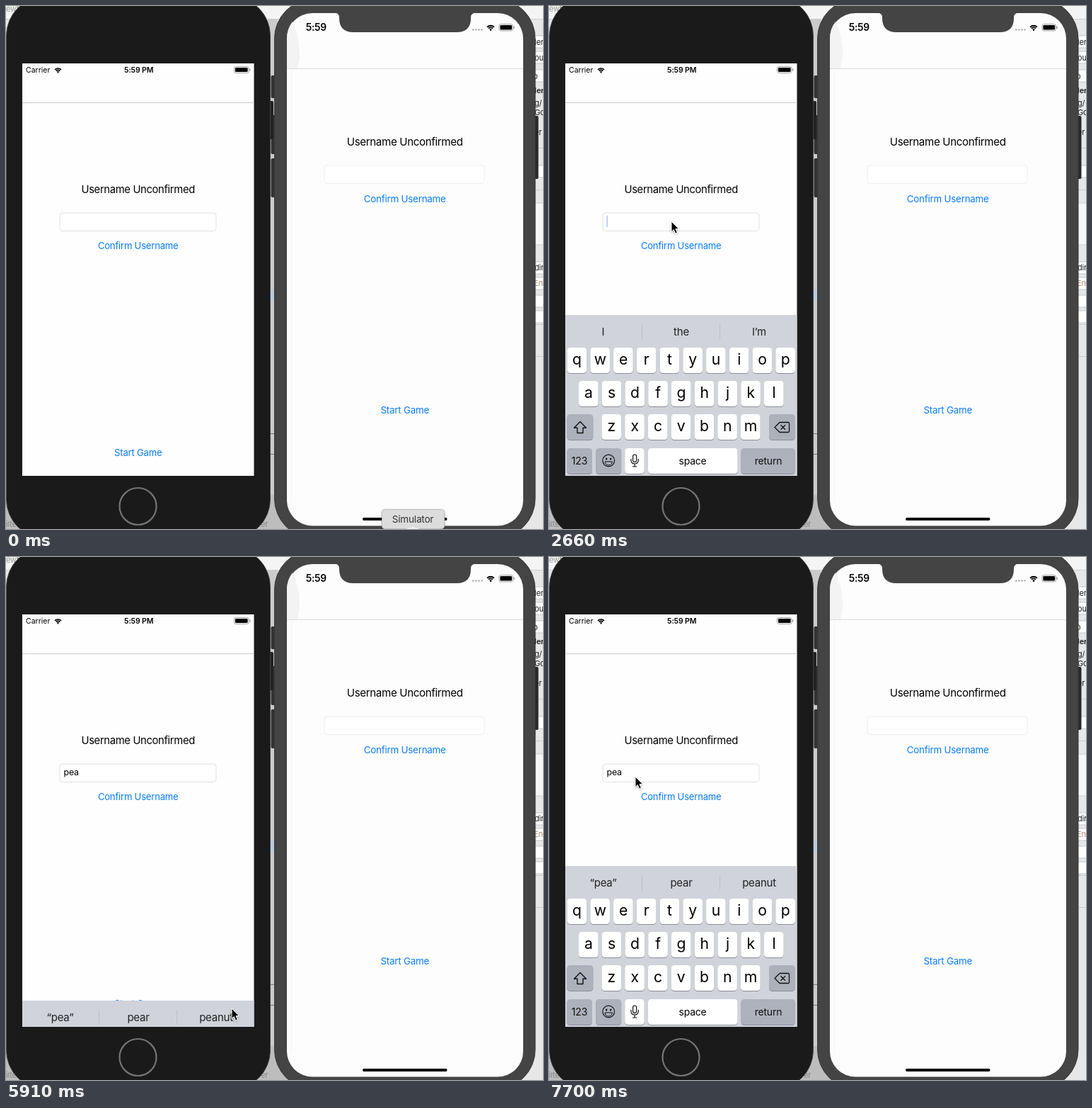
Write an HTML page that moves like this. It is 759 px wide and 738 px high and loops after 8 s.

```html
<!DOCTYPE html>
<html lang="en">
<head>
<meta charset="utf-8">
<title>Username screen</title>
<style>
html, body { margin: 0; width: 100%; height: 100%; overflow: hidden; background: #e8e8e8; }
svg { display: block; width: 759px; height: 738px; }
text { font-family: Inter, "Liberation Sans", sans-serif; letter-spacing: -.016em; white-space: pre; }
</style>
</head>
<body>
<svg id="stage" viewBox="0 0 759 738" xmlns="http://www.w3.org/2000/svg">
  <defs>
    <clipPath id="screen"><rect x="23" y="81" width="327.5" height="582"/></clipPath>
    <filter id="lift" x="-30%" y="-20%" width="160%" height="140%">
      <feDropShadow dx="0" dy="1" stdDeviation="1.5" flood-opacity=".35"/>
    </filter>
  </defs>
  <g id="back"></g>
  <g id="phones"></g>
  <g id="form"></g>
  <g clip-path="url(#screen)"><g id="keys"></g></g>
  <g id="tip"></g>
  <g id="mouse" filter="url(#lift)">
    <path d="M0 0V14.6L3.3 11.6 5.6 17 8.3 15.9 6 10.6H10.6Z" fill="#000" stroke="#fff" stroke-width="1"/>
  </g>
</svg>
<script>
const NS = 'http://www.w3.org/2000/svg';
const $ = id => document.getElementById(id);

function add(parent, tag, attrs, content) {
  const el = document.createElementNS(NS, tag);
  for (const k in attrs) el.setAttribute(k, attrs[k]);
  if (content) el.textContent = content;
  parent.appendChild(el);
  return el;
}
const box = (p, x, y, width, height, fill, rx = 0, more) =>
  add(p, 'rect', { x, y, width, height, fill, rx, ...more });
const line = (p, d, stroke, width = 1, more) =>
  add(p, 'path', { d, stroke, fill: 'none', 'stroke-width': width, ...more });
const text = (p, x, y, str, size, fill = '#000', more) =>
  add(p, 'text', { x, y, fill, 'font-size': size, ...more }, str);
const mid = { 'text-anchor': 'middle' };

const BLUE = '#0a7cf5';

function drawBack() {
  const g = $('back');
  box(g, 0, 0, 759, 738, '#e7e7e7');
  box(g, 0, 0, 759, 18, '#f4f4f4');
  box(g, 0, 18, 759, 1, '#cfcfcf');
  box(g, 370, 19, 14, 719, '#cbcbcb');
  box(g, 370, 400, 14, 16, '#bccbdb');
  box(g, 370, 603, 14, 1, '#777');
  box(g, 370, 632, 14, 1, '#777');
  box(g, 0, 690, 400, 48, '#bdbdbd');
  text(g, 0, 8, 'ewf', 11, '#999');
  text(g, 0, 735, 'ilte', 11, '#858585');
  text(g, 360, 735, 'er', 11, '#858585');
  for (const y of [42, 64, 90, 225, 361, 383, 408, 430])
    box(g, 740, y, 30, 17, '#fff', 0, { stroke: '#c6c6c6' });
  box(g, 740, 278, 30, 59, '#f6f6f6', 0, { stroke: '#cecece' });
  for (const y of [200, 259, 449, 494]) box(g, 748, y, 11, 1, '#cbcbcb');
  const bits = [['ler', 55], ['ou', 77], ['o', 103], ['ler', 123], ['g/', 141], ['Go', 154], ['er', 182], ['dir', 373]];
  for (const [s, y] of bits)
    text(g, s === 'o' ? 745 : 747, y, s, 11, '#222', { 'font-weight': y === 123 ? 600 : 400 });
  text(g, 746, 395, 'Enc', 11, '#b58a72');
}

function wifi(g, x, y, s) {
  for (const r of [2, 5, 8]) {
    const k = r * s * .72;
    line(g, `M${x - k} ${y - k}A${r * s} ${r * s} 0 0 1 ${x + k} ${y - k}`, '#000', 2.1 * s);
  }
  add(g, 'circle', { cx: x, cy: y - .6, r: 1.1 * s });
}

function battery(g, x, y, w, h) {
  box(g, x, y, w, h, 'none', 2.4, { stroke: '#999', 'stroke-width': .9 });
  box(g, x + 1.4, y + 1.4, w - 2.8, h - 2.8, '#000', 1.3);
  box(g, x + w + 1, y + h / 2 - 1.7, 1.3, 3.4, '#999', .6);
}

function drawForm(g, x, y, scale, fieldX, fieldW, fieldY, startY, edge) {
  text(g, x, y, 'Username Unconfirmed', 17 * scale, '#000', { ...mid, style: 'letter-spacing:-.024em' });
  box(g, fieldX, fieldY, fieldW, 25.5, '#fff', 4, { stroke: edge });
  text(g, x, y + 79 * (scale > .88 ? 1.02 : 1), 'Confirm Username', 15 * scale, BLUE, mid);
  text(g, x, startY, 'Start Game', 15 * scale, BLUE, mid);
}

function drawPhones() {
  const g = $('phones');
  // side buttons
  for (const [y, h] of [[98, 32], [154, 55], [215, 55]]) box(g, 374.5, y, 9, h, '#333', 2);
  box(g, 743, 155, 9.5, 89, '#292929', 2);

  // left phone
  box(g, 370, 134, 8, 54, '#222', 2);
  box(g, .5, -13, 373, 764, '#1a1a1a', 55, { stroke: '#444', 'stroke-width': .8 });
  box(g, 23, 81, 327.5, 582, '#fefefe');
  box(g, 23, 136, 327.5, 1, '#cdcdcd');
  text(g, 28, 94, 'Carrier', 10.5, '#000', { style: 'letter-spacing:0' });
  wifi(g, 73.5, 94.4, .78);
  text(g, 187.7, 94, '5:59 PM', 10.6, '#000', { ...mid, 'font-weight': 600 });
  battery(g, 322.5, 85.5, 20.5, 9);
  add(g, 'circle', { cx: 186.5, cy: 706, r: 26, fill: '#1a1a1a', stroke: '#757575', 'stroke-width': 2.2 });

  // right phone
  box(g, 379.5, -10, 368.5, 761, '#444', 56, { stroke: '#363636' });
  box(g, 397, 10, 334, 723.5, '#fdfdfd', 36);
  line(g, 'M403.5 89V700', '#f5f5f5');
  add(g, 'path', { d: 'M397 46Q397 32 405 22Q416 45 415 72L412 88H397Z', fill: '#f3f3f3' });
  box(g, 397, 88, 334, 1, '#dcdcdc');
  add(g, 'path', {
    d: 'M464 9.5Q471 10 471 16V17Q471 37 491 37H637Q657 37 657 17V16Q657 10 664 9.5Z', fill: '#444'
  });
  text(g, 438.3, 35, '5:59', 13.8, '#000', { ...mid, 'font-weight': 600 });
  for (let i = 0; i < 4; i++) add(g, 'circle', { cx: 660.3 + i * 4.1, cy: 33.5, r: 1.4, fill: '#bbb' });
  wifi(g, 685, 34.8, .86);
  battery(g, 697, 25.6, 19.5, 9.4);
  box(g, 504, 722, 119.5, 4, '#000', 2);

  const f = $('form');
  drawForm(f, 186.7, 264, .872, 76, 221, 292, 635, '#e1e1e1');
  drawForm(f, 563.7, 196.5, .89, 450, 226, 225, 575, '#eee');
}

// keyboard
const ROWS = [['qwertyuiop', 39.4, 482], ['asdfghjkl', 55.8, 529], ['zxcvbnm', 88.3, 576]];
const PITCH = 32.75, KEY_H = 36, GREY = '#adb1bb';
const ui = { words: [] };

function key(g, x, y, w, fill = '#fff') {
  box(g, x, y + 1, w, KEY_H, '#8c8f96', 4.4);
  return box(g, x, y, w, KEY_H, fill, 4.4);
}

function drawKeys() {
  const g = $('keys');
  box(g, 23, 436, 328, 228, '#d0d3da');
  ui.pick = box(g, 133, 444, 107.5, 31, '#e9ebee', 4);
  ui.bars = line(g, 'M131.5 449V470M241.5 449V470', '#bcc0c7');
  for (const x of [76.5, 187, 297]) ui.words.push(text(g, x, 465, ' ', 15, '#222', mid));

  for (const [chars, x0, y] of ROWS)
    [...chars].forEach((c, i) => {
      const x = x0 + i * PITCH;
      key(g, x - 13.8, y, 27.6);
      text(g, x, y + 24, c, 21.2, '#000', mid);
    });

  key(g, 25.5, 576, 36.8, GREY);
  line(g, 'M44 586.5L52.5 595.3H48V602.5H40V595.3H35.5Z', '#111', 1.4, { 'stroke-linejoin': 'round' });
  key(g, 311, 576, 36.8, GREY);
  line(g, 'M319 594.5L326 587.5H338Q339.5 587.5 339.5 589V600Q339.5 601.5 338 601.5H326ZM327.5 591.2L334 597.8M334 591.2L327.5 597.8', '#111', 1.3, { 'stroke-linejoin': 'round' });

  key(g, 25.5, 624, 35.5, GREY);
  text(g, 43, 646.8, '123', 14.2, '#111', mid);
  key(g, 66.2, 624, 36, GREY);
  add(g, 'circle', { cx: 84.2, cy: 641.5, r: 8.4, fill: 'none', stroke: '#111', 'stroke-width': 1.2 });
  for (const x of [81.2, 87.2]) add(g, 'ellipse', { cx: x, cy: 639, rx: 1.1, ry: 1.6 });
  add(g, 'path', { d: 'M79 643H89.4Q88.6 648 84.2 648T79 643Z', fill: 'none', stroke: '#111' });
  key(g, 107.2, 624, 27.5);
  box(g, 118.6, 633, 5, 10.5, 'none', 2.5, { stroke: '#111', 'stroke-width': 1.2 });
  line(g, 'M116 639V641Q116 646 121.1 646T126.2 641V639M121.1 646V650M118 650H124.2', '#111', 1.2);
  key(g, 140, 624, 126.5);
  text(g, 203, 646.5, 'space', 14, '#000', mid);
  ui.enter = key(g, 271.5, 624, 76.3, GREY);
  text(g, 310, 646.5, 'return', 14, '#111', mid);

  ui.pop = add(g, 'g', { filter: 'url(#lift)' });
  add(ui.pop, 'path', {
    d: 'M-25 -48Q-25 -57 -16 -57H16Q25 -57 25 -48V-18C25 -5 13.8 -6 13.8 8V32Q13.8 36 9.8 36H-9.8Q-13.8 36 -13.8 32V8C-13.8 -6 -25 -5 -25 -18Z',
    fill: '#fcfcfc'
  });
  ui.popText = text(ui.pop, 0, -21.5, ' ', 30, '#000', mid);
}

function drawField() {
  const g = $('form');
  ui.mark = box(g, 79.5, 295.5, 12.5, 17.5, '#c3d4f3');
  ui.typed = text(g, 81.5, 308.4, ' ', 12.4, '#000');
  ui.caret = box(g, 81.4, 295.5, 1.7, 16.5, '#4268e0');
}

function drawTip() {
  const g = $('tip');
  box(g, 531.5, 710.5, 88, 27, '#dcdcdc', 4, { stroke: '#c0c0c0', filter: 'url(#lift)' });
  add(g, 'path', { d: 'M565 738L575 735 585 738Z', fill: '#f2f2f2' });
  text(g, 575, 728.6, 'Simulator', 13.6, '#333', mid);
}

// Each step changes part of the state and holds until the next one.
const START = { tip: 1, at: null, drop: 240, caret: 0, typed: '', mark: 0, words: ['I', 'the', 'I’m'], pick: 0, pop: '', enter: 0 };
const STEPS = [
  [300, { tip: 0, at: [560, 712] }],
  [450, { at: [517, 655] }],
  [600, { at: [445, 560] }],
  [740, { at: [360, 462] }],
  [890, { at: [275, 382] }],
  [1040, { at: [210, 330] }],
  [1190, { at: [180, 309] }],
  [1330, { at: [173, 304] }],
  [1620, { drop: 165, caret: 1 }],
  [1770, { drop: 48.5 }],
  [1920, { drop: 6 }],
  [2060, { drop: 0 }],
  [2660, { caret: .35 }],
  [2810, { caret: 0 }],
  [3110, { caret: 1 }],
  [3260, { at: [168, 335] }],
  [3410, { at: [144, 432] }],
  [3550, { at: [121, 524] }],
  [3690, { at: [114, 549] }],
  [3840, { pop: 'd' }],
  [3990, { pop: 'd' }],
  [4140, { pop: '', typed: 'd', words: ['“d”', 'do', 'did'] }],
  [4280, { at: [172, 529] }],
  [4430, { at: [240, 509] }],
  [4580, { at: [262, 504], pop: 'i' }],
  [4730, { pop: '', typed: 'di', mark: 1, pick: 1, words: ['“di”', 'do', 'did'] }],
  [4880, { at: [283, 504] }],
  [5030, { at: [290, 504], pop: 'o' }],
  [5170, { at: [300, 556], pop: '', typed: 'dio', words: ['“dio”', 'pea', 'dip'] }],
  [5320, { at: [319, 637] }],
  [5470, { enter: 1, typed: 'pea', mark: 0, pick: 0, words: ['“pea”', 'pear', 'peanut'] }],
  [5620, { enter: 0, caret: 0, drop: 70 }],
  [5770, { drop: 190 }],
  [5920, { drop: 240, at: [306, 610] }],
  [6060, { at: [266, 532] }],
  [6210, { at: [214, 450] }],
  [6360, { at: [179, 399] }],
  [6510, { at: [168, 386] }],
  [6660, { at: [142, 338] }],
  [6800, { at: [122, 310] }],
  [7100, { drop: 165, caret: 1 }],
  [7250, { drop: 48.5 }],
  [7400, { drop: 4 }],
  [7550, { drop: 0, caret: .35 }],
  [7700, { caret: 0 }]
];
const LOOP = 8000;
const states = [[0, START]];
for (const [t, change] of STEPS) states.push([t, { ...states.at(-1)[1], ...change }]);

const show = (el, on) => el.setAttribute('visibility', on ? 'visible' : 'hidden');
const move = (el, x, y) => el.setAttribute('transform', `translate(${x} ${y})`);

function keyPlace(c) {
  const [chars, x0, y] = ROWS.find(r => r[0].includes(c));
  return [x0 + chars.indexOf(c) * PITCH, y];
}

function render(s) {
  show($('tip'), s.tip);
  show($('mouse'), s.at);
  if (s.at) move($('mouse'), ...s.at);
  move($('keys'), 0, s.drop);
  ui.words.forEach((el, i) => {
    el.textContent = s.words[i];
    el.setAttribute('fill', s.pick && i === 1 ? '#000' : '#222');
  });
  show(ui.pick, s.pick);
  show(ui.bars, !s.pick);
  ui.enter.setAttribute('fill', s.enter ? '#fff' : GREY);
  ui.typed.textContent = s.typed;
  const w = s.typed ? ui.typed.getComputedTextLength() : 0;
  ui.caret.setAttribute('x', 81.4 + w);
  ui.caret.setAttribute('opacity', s.caret);
  ui.mark.setAttribute('width', w + 2.5);
  show(ui.mark, s.mark);
  show(ui.pop, s.pop);
  if (s.pop) {
    ui.popText.textContent = s.pop;
    move(ui.pop, ...keyPlace(s.pop));
  }
}

drawBack();
drawPhones();
drawField();
drawKeys();
drawTip();

let last;
function tick() {
  const t = performance.now() % LOOP;
  const now = states.findLast(([from]) => from <= t)[1];
  if (now !== last) render(last = now);
  requestAnimationFrame(tick);
}
tick();
</script>
</body>
</html>
```
